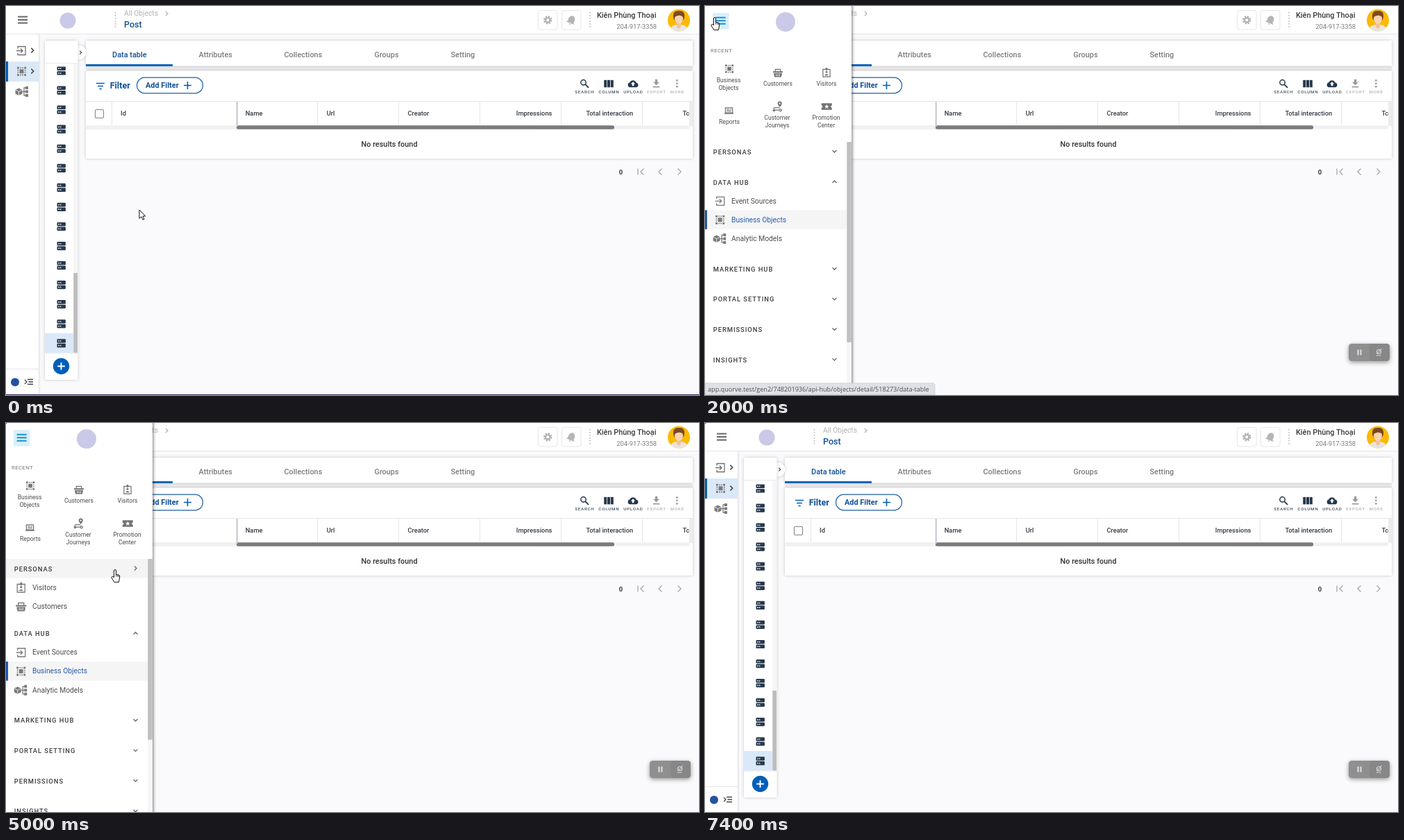
These frames come from a looping animation (998x561 px, 7.6 s). An HTML page:

```html
<!DOCTYPE html>
<html lang="en">
<head>
<meta charset="utf-8">
<title>Navigation drawer</title>
<style>
html, body { margin: 0; width: 100%; height: 100%; overflow: hidden; background: #fafafc; }
svg { display: block; width: 100vw; height: 100vh; font-family: Roboto, Arial, sans-serif; }
.card { fill: #fff; filter: drop-shadow(0 0.5px 2px rgba(0,0,0,.2)); }
.line { fill: none; stroke: currentColor; stroke-width: 1.3; }
.fill { fill: currentColor; }
</style>
</head>
<body>
<svg id="stage" viewBox="0 0 998 561" xmlns="http://www.w3.org/2000/svg"></svg>
<script>
const BLUE = '#005eb8', INK = '#27384c', GREY = '#7a7a7a', RULE = '#e6e6e6';
const LOOP = 7600, STEP = 200;

const rect = (x, y, w, h, fill, rx = 0, more = '') =>
  `<rect x="${x}" y="${y}" width="${w}" height="${h}" rx="${rx}" fill="${fill}" ${more}/>`;
const circle = (x, y, r, fill, more = '') => `<circle cx="${x}" cy="${y}" r="${r}" fill="${fill}" ${more}/>`;
const stroke = (d, color, width = 1.3, more = '') =>
  `<path d="${d}" fill="none" stroke="${color}" stroke-width="${width}" ${more}/>`;
const shape = (d, fill, more = '') => `<path d="${d}" fill="${fill}" ${more}/>`;
const text = (x, y, str, size, color, weight = 400, anchor = 'start', spacing = 0) =>
  `<text x="${x}" y="${y}" font-size="${size}" fill="${color}" font-weight="${weight}" text-anchor="${anchor}" letter-spacing="${spacing}">${str}</text>`;
const group = (id, body, more = '') => `<g id="${id}" ${more}>${body}</g>`;
const each = (list, draw) => list.map(draw).join('');
const chevron = (x, y, turn, color, size = 3, width = 1.3, id = '') =>
  `<g transform="translate(${x} ${y})"><path ${id && `id="${id}"`} transform="rotate(${turn})" d="M${-size} ${-size / 2}L0 ${size / 2}L${size} ${-size / 2}" fill="none" stroke="${color}" stroke-width="${width}"/></g>`;
const bars = (x, y, color) => each([0, 4.5, 9], dy => rect(x, y + dy, 14, 2, color));
const plus = (x, y, r, color, width) => stroke(`M${x - r} ${y}H${x + r}M${x} ${y - r}V${y + r}`, color, width);
const dots = (x, y) => stroke(`M${x} ${y}v23`, '#b4b4b4', 1.6, 'stroke-dasharray="1.6 2.4"');

// Glyphs are centred on 0,0.
const box = (x, y, w, h) => `<rect class="fill" x="${x}" y="${y}" width="${w}" height="${h}"/>`;
const line = d => `<path class="line" d="${d}"/>`;
const solid = d => `<path class="fill" fill-rule="evenodd" d="${d}"/>`;
const glyphs = {
  events: line('M-5-3V-6H6V6H-5V3M-7 0H2M-1-3L2 0L-1 3'),
  objects: box(-3, -3, 6, 6) +
    each([-6.5, 3.7], x => each([-6.5, 3.7], y => box(x, y, 2.8, 2.8))) +
    line('M-2.5-5.2H2.5M-2.5 5.2H2.5M-5.2-2.5V2.5M5.2-2.5V2.5').replace('/>', ' stroke-dasharray="2 1"/>'),
  models: solid('M-5-5L0-2.5V3L-5 5.5L-10 3V-2.5Z') + '<path d="M-10-2.5L-5 0L0-2.5M-5 0V5.5" fill="none" stroke="#fff" stroke-width=".8"/>' +
    each([-7.5, -2, 3.5], y => box(4.5, y, 4, 4)) + line('M0 0H4.5M4.5-5.5H2.5V5.5H4.5'),
  visitors: line('M-5.5-5H5.5V6.5H-5.5Z') + box(-1.4, -7.5, 2.8, 4) +
    '<circle class="fill" cy="-.8" r="1.6"/>' + solid('M-3 4.5Q0 0 3 4.5Z'),
  customers: line('M-4-2V-5.5H4V-2') + box(-7.5, -2.5, 15, 2.2) + solid('M-6.5.5H6.5L5.2 6.5H-5.2ZM-3 2V5H-2V2ZM-.5 2V5H.5V2ZM2 2V5H3V2Z'),
  reports: line('M-5.5-4.5H5.5V3H-5.5ZM-3.5-2H0M-3.5.5H3.5M1.5-2H3.5') + box(-7, 3.5, 14, 1.6),
  journeys: solid('M4-8A3.3 3.3 0 0 1 7.3-4.7Q7-2.5 4 1Q1-2.5.7-4.7A3.3 3.3 0 0 1 4-8ZM4-6A1.2 1.2 0 0 0 4-3.5A1.2 1.2 0 0 0 4-6Z') +
    line('M3.5 1.8H-3Q-5.3 1.8-5.3 3.5T-3 5.5H3') + '<circle class="line" cx="5" cy="5.5" r="1.7"/><circle class="fill" cx="-5" cy="6" r="1.8"/>',
  promo: solid('M-8-5H8V-1.7A1.7 1.7 0 0 0 8 1.7V5H-8V1.7A1.7 1.7 0 0 0-8-1.7ZM0-3.5L-1-1H-3.4L-1.6.6L-2.3 3.1L0 1.7L2.3 3.1L1.6.6L3.4-1H1Z'),
  gear: '<circle class="line" r="3.6" style="stroke-width:2.8"/><circle class="line" r="5.7" style="stroke-width:2.2" stroke-dasharray="2.6 1.877"/>',
  bell: '<g transform="rotate(22)">' + solid('M0-7Q5-6 5-1V3L7 5H-7L-5 3V-1Q-5-6 0-7ZM-2 6H2Q0 9-2 6Z') + '</g>',
  search: '<circle class="line" cx="-1.5" cy="-1.5" r="3.7" style="stroke-width:1.5"/>' + line('M1.3 1.3L6 6').replace('/>', ' style="stroke-width:1.9"/>'),
  column: each([-6.8, -2, 2.8], x => box(x, -5, 4, 10.5)),
  upload: solid('M-4.5 5.5A3.6 3.6 0 0 1-4.7-1.5A5 5 0 0 1 4.6-1.2A3.4 3.4 0 0 1 4.5 5.5ZM-1.3 3.5H1.3V.8H3.2L0-2.5L-3.2.8H-1.3Z'),
  export: solid('M-1.7-6H1.7V-2H4.5L0 2.5L-4.5-2H-1.7ZM-4.8 4H4.8V5.7H-4.8Z'),
  more: each([-4.5, 0, 4.5], y => `<circle class="fill" cy="${y}" r="1.4"/>`),
};
const icon = (name, x, y, color = GREY, scale = 1) =>
  `<g transform="translate(${x} ${y}) scale(${scale})" color="${color}">${glyphs[name]}</g>`;

function header() {
  const tile = (x, name) => rect(x, 6.5, 27.5, 27.5, '#fff', 3, `stroke="${RULE}"`) + icon(name, x + 13.7, 20.3, '#b5b5b5', .92);
  return rect(0, 0, 998, 40, '#fff') + rect(0, 40, 998, 1, '#e4e4e6') +
    bars(17, 14.5, '#666') + circle(89, 21, 11.5, '#c9c9e8') +
    dots(157.5, 9) + text(170, 14.3, 'All Objects', 10.25, '#b3b3b3') + chevron(231.5, 11, -90, '#b3b3b3') +
    text(170, 31, 'Post', 12.5, '#0f5099', 500) +
    tile(766.5, 'gear') + tile(800.5, 'bell') + dots(841, 9) +
    text(936.5, 16.6, 'Kiên Phùng Thoại', 10.92, '#3a3a3a', 500, 'end') +
    text(937, 33.2, '204-917-3358', 9.36, GREY, 400, 'end') + avatar();
}

function avatar() {
  return `<clipPath id="face"><circle cx="969" cy="20.5" r="16"/></clipPath>` + circle(969, 20.5, 16, '#fbb900') +
    `<g clip-path="url(#face)">` + shape('M955 38Q956 28 965 27H973Q982 28 983 38Z', '#e9e4df') +
    shape('M966 23H972V30L969 33L966 30Z', '#f0c39c') + rect(961, 7, 16, 15, '#7b4a22', 6) +
    `<ellipse cx="969" cy="18.5" rx="6" ry="7.5" fill="#f8d3b0"/>` + shape('M962.5 16Q963 8 969 8T975.5 16Q970 11 962.5 16Z', '#7b4a22') + '</g>';
}

function rail() {
  return rect(0, 41, 47, 520, '#fff', 0, 'style="filter:drop-shadow(1px 0 1.5px rgba(0,0,0,.13))"') +
    rect(0, 80, 47, 29, '#dbe8f7') + rect(0, 80, 3, 29, BLUE) +
    icon('events', 22, 64.5, '#707070') + chevron(38, 64, -90, '#444', 3.4, 1.5) +
    icon('objects', 22.5, 94.3, GREY) + chevron(38, 94, -90, '#444', 3.4, 1.5) +
    icon('models', 23.5, 123.5, GREY) +
    group('railFoot', rect(0, 523, 47, 1, RULE) + circle(13, 542.5, 6, '#2452a0') +
      stroke('M27 539l3 3-3 3', '#444', 1.3) + stroke('M31 538.5h8M32.5 542h6.5M31 545.5h8', '#444', 1.4));
}

function objectList() {
  const row = (_, i) => {
    const y = 93.4 + i * 28.06;
    return each([-6, .6], dy => rect(73.5, y + dy, 12.4, 5.6, INK, 1.2) + each([76, 78.6], x => circle(x, y + dy + 2.8, .85, '#fff')));
  };
  return circle(105, 67, 10.5, '#fff', 'class="card"') +
    rect(56, 50, 47.5, 489, '#fff', 1, 'id="listPanel" class="card"') + chevron(107.5, 67, -90, '#444', 2.4, 1.2) +
    rect(56, 82, 47, 1, '#e9e9ee') + rect(97, 83, 6, 417, '#f6f6f6') +
    group('listBody', rect(56, 472, 41, 28.5, '#dae8fa') + each([...Array(15)], row) +
      rect(97.3, 385, 5.7, 115.5, '#bdbdbd', 1) + rect(56, 500.5, 47, 1, '#eeeeee') +
      circle(79.5, 519.5, 11.7, BLUE) + plus(79.5, 519.5, 5.3, '#fff', 1.9));
}

function table() {
  const tabs = [[153, 'Data table'], [277.5, 'Attributes'], [400.5, 'Collections'], [530.5, 'Groups'], [640.5, 'Setting']];
  const heads = [[165, 'Id'], [344.7, 'Name'], [461.7, 'Url'], [578.4, 'Creator'], [734.8, 'Impressions'], [835.5, 'Total interaction']];
  const tools = [[833, 'search'], [868, 'column'], [903, 'upload'], [936.5, 'export'], [966.3, 'more']];
  return rect(115, 86, 874, 8, '#ececee') + rect(115, 50, 874, 36.5, '#fff', 0, 'class="card"') +
    rect(115, 84, 125, 2.8, BLUE) +
    each(tabs, ([x, s], i) => text(x, 74, s, 10.92, i ? '#7d7d7d' : '#0f5099', 500)) +
    rect(115, 93.5, 874, 126.5, '#fff', 0, 'class="card"') +
    stroke('M130 111.5h12M132 115.5h8M134.3 119.5h3.4', BLUE, 1.4) + text(149.7, 119.3, 'Filter', 12.5, '#0f5099', 700) +
    rect(188.5, 103.2, 95, 22.6, '#fff', 11.3, `stroke="#1c5da5" stroke-width="1.2"`) +
    text(201, 118.4, 'Add Filter', 10.92, '#0f5099', 700) + plus(261.5, 114.5, 5.5, BLUE, 1.6) +
    each(tools, ([x, name], i) => icon(name, x, 111.8, i < 3 ? INK : '#9a9a9a') +
      text(x + .4, 126.3, name.toUpperCase(), 6.24, i < 3 ? '#44505e' : '#b5b5b5', 500, 'middle', .75)) +
    rect(115, 137, 874, 1, RULE) + each([152, 448, 565, 682, 799, 916], x => rect(x, 138, 1, 34, RULE)) +
    rect(128.5, 149.5, 12, 12, '#fff', 1.5, 'stroke="#858585" stroke-width="1.1"') +
    each(heads, ([x, s]) => text(x, 158.3, s, 9.36, '#333a42', 500)) +
    `<svg x="970" y="138" width="13.5" height="34">${text(4.5, 20.3, 'Total', 9.36, '#333a42', 500)}</svg>` +
    rect(984, 138, 5, 35, '#ececec') +
    rect(115, 172, 218, 6, '#f1f1f1') + rect(332, 172.5, 652, 5, '#f0f0f0') +
    rect(332, 172.2, 544, 5.6, '#7b7b7b', 2.5) + rect(331.7, 138, 2, 36, '#c3c6cf') +
    text(552, 203.3, 'No results found', 10.92, '#333', 500, 'middle') +
    text(882.8, 242.5, '0', 9.36, '#333', 700) +
    stroke('M910 234.5v9M918.5 234.5l-4.5 4.5 4.5 4.5M944.5 234.5l-4.5 4.5 4.5 4.5M967.5 234.5l4.5 4.5-4.5 4.5', '#a5a5a5', 1.3);
}

function recorder() {
  return rect(927, 487, 59, 25, '#8f8f8f', 4.5, 'style="filter:drop-shadow(0 2px 3px rgba(0,0,0,.4))"') +
    rect(957, 487, 29, 25, '#878787', 4.5) + rect(939.5, 495.5, 2, 8, '#e2e2e2') + rect(943.5, 495.5, 2, 8, '#e2e2e2') +
    circle(970.5, 498.5, 3, 'none', 'stroke="#d6d6d6" stroke-width="1.2"') +
    stroke('M966.5 504h7M974.5 494l-7 8', '#d6d6d6', 1.1);
}

function drawer() {
  const recent = [
    ['objects', 35, 90.5, 34, 110, ['Business', 'Objects']], ['customers', 105, 96.5, 105, 115.3, ['Customers']],
    ['visitors', 175, 96, 175, 115.3, ['Visitors']], ['reports', 34.5, 151, 35, 170, ['Reports']],
    ['journeys', 104, 145, 104, 164.3, ['Customer', 'Journeys']], ['promo', 175.3, 145, 174.5, 164.3, ['Promotion', 'Center']]];
  const heading = (y, s, turn = 0, id = '') => text(11.7, y + 3.5, s, 9.36, '#3c3c3c', 500, 'start', .98) + chevron(186.5, y - .5, turn, '#666', 3, 1.3, id);
  const item = (y, name, s, active) =>
    (active ? rect(0, y - 14, 204, 27.5, '#f5f5f6') + rect(0, y - 14, 3, 27.5, '#1f5aa9') : '') +
    icon(name, 21.7, y, GREY) + text(38, y + 3.4, s, 10.3, active ? '#2a5ca8' : '#4c4c4c');
  const below = ['MARKETING HUB', 'PORTAL SETTING', 'PERMISSIONS', 'INSIGHTS', 'EMAIL TEMPLATE'];
  return rect(0, -5, 211, 571, '#fff', 0, 'style="filter:drop-shadow(1px 0 2px rgba(0,0,0,.55))"') +
    rect(11, 10, 23.5, 23.5, '#d9effa', 2) + bars(15.7, 15.7, '#1692cf') + circle(116, 23, 14, '#c9c9e8') +
    text(8, 67, 'RECENT', 7.8, '#777', 400, 'start', .35) +
    each(recent, ([name, x, y, tx, ty, words]) => icon(name, x, y, '#737373', .93) +
      each(words, (w, i) => text(tx, ty + i * 11, w, 8.58, '#4c4c4c', 400, 'middle'))) +
    rect(0, 196, 204, 27.5, '#f4f4f5', 0, 'id="hover"') + heading(210, 'PERSONAS', 0, 'turner') +
    `<clipPath id="fold"><rect id="foldBox" y="224" width="204"/></clipPath>` +
    group('personas', item(237.5, 'visitors', 'Visitors') + item(265, 'customers', 'Customers'), 'clip-path="url(#fold)"') +
    group('groups', heading(254, 'DATA HUB', 180) + item(281.3, 'events', 'Event Sources') +
      item(308.4, 'objects', 'Business Objects', true) + item(335.6, 'models', 'Analytic Models') +
      each(below, (s, i) => heading(379.3 + i * 43.6, s))) +
    rect(204, 196, 7, 365, '#f6f6f6') + rect(204.3, 196, 6.4, 289, '#c0c0c0', 1, 'id="thumb"');
}

function statusBar() {
  return shape('M0 544H328Q331 544 331 547V561H0Z', '#dfe1e5', 'stroke="#c4c6ca" stroke-width=".7"') +
    `<text x="4" y="556.2" font-size="9.1" fill="#4d5156" style="font-family:'Open Sans',sans-serif">app.quorve.test/gen2/748201936/api-hub/objects/detail/518273/data-table</text>`;
}

const cursorArt = 'stroke="#111" stroke-width="1" stroke-linejoin="round"';
document.getElementById('stage').innerHTML =
  rect(0, 0, 998, 561, '#fafafc') + table() + objectList() + rail() + header() +
  group('recorder', recorder()) + rect(0, 560, 998, 1, '#3b3168', 0, 'id="edge"') +
  group('drawer', drawer()) + group('status', statusBar()) + rect(0, 0, 1, 1, '#222', 0, 'id="corner"') +
  group('cursor',
    shape('M0 0V12.5L2.9 9.8L5 14.4L7 13.5L5 9.1H8.8Z', '#fff', `id="arrow" ${cursorArt}`) +
    group('hand', shape('M-1.5 1A1.5 1.5 0 0 1 1.5 1V6.3L5.4 7.2Q7 7.7 6.8 9.2L6.2 13.8L5.3 17.6H-1L-4.6 12Q-5.6 10-4.2 9.4T-1.5 11Z', '#fff', cursorArt) +
      stroke('M1.5 6.3V9.5M3.6 7V9.8M5.4 7.4V10', '#111', .8)));

const el = id => document.getElementById(id);
const show = (id, on) => el(id).setAttribute('visibility', on ? 'visible' : 'hidden');
const move = (id, x, y) => el(id).setAttribute('transform', `translate(${x} ${y})`);

// Rows are [time, ...values].
const cursorPath = [[0, 192, 294], [1200, 14, 17], [2400, 14, 17], [3000, 157, 212], [5800, 157, 212], [6700, 20.5, 22]];
const slide = [[1600, -220], [1800, -30], [2000, 0], [6600, 0], [6800, -1.5], [7000, -220]];
const unfold = [[3000, 0, 0], [3200, 45, -80], [3400, 54.5, -180], [4800, 54.5, -180], [5000, 49.7, -90], [5200, 0, 0]];

function sample(rows, t) {
  const next = rows.findIndex(r => r[0] > t);
  if (next < 1) return rows[next < 0 ? rows.length - 1 : 0].slice(1);
  const a = rows[next - 1], b = rows[next], u = (t - a[0]) / (b[0] - a[0]), k = u * u * (3 - 2 * u);
  return a.slice(1).map((v, i) => v + (b[i + 1] - v) * k);
}

function draw(t) {
  const [cx, cy] = sample(cursorPath, t), [dx] = sample(slide, t), [height, turn] = sample(unfold, t);
  const settled = t >= 1400 ? 1 : 0;
  move('cursor', cx, cy);
  show('cursor', t < 7400);
  el('arrow').style.display = t < 1000 ? '' : 'none';
  el('hand').style.display = t < 1000 ? 'none' : '';

  move('listBody', 0, settled);
  move('railFoot', 0, settled);
  el('listPanel').setAttribute('height', 489 + settled);
  show('edge', !settled);
  show('recorder', t >= 200);
  show('corner', t >= 4000);

  move('drawer', dx, 0);
  el('drawer').style.display = dx > -215 ? '' : 'none';
  el('hover').style.display = cy >= 196 ? '' : 'none';
  el('foldBox').setAttribute('height', height);
  move('groups', 0, height);
  el('turner').setAttribute('transform', `rotate(${turn})`);
  el('thumb').setAttribute('height', 365 * 365 / (461 + height));
  show('status', t >= 2000 && t < 2600);
}

const start = performance.now();
function tick() {
  const t = (performance.now() - start) % LOOP;
  draw(Math.floor(t / STEP) * STEP);
  requestAnimationFrame(tick);
}
tick();
</script>
</body>
</html>
```
